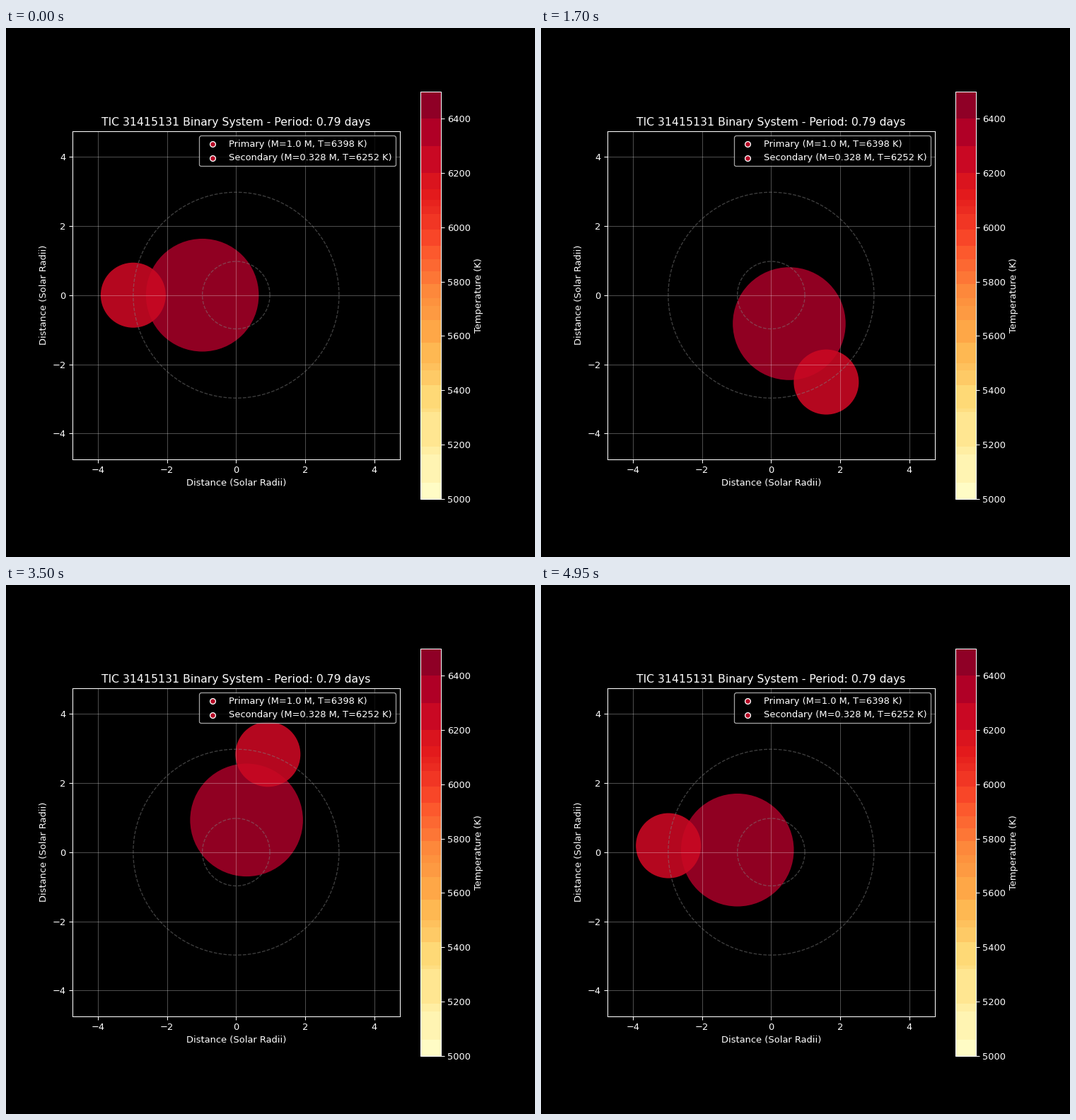
These frames come from a looping animation (748 px wide and 748 px high, 5 s). A matplotlib script:

```python
import numpy as np
import matplotlib.pyplot as plt
from matplotlib.animation import FuncAnimation
from matplotlib.cm import ScalarMappable
from matplotlib.colors import Normalize
from matplotlib.patches import Circle

FRAMES = 100
INTERVAL = 50

# Binary system, in solar units and days
M1, M2 = 1.0, 0.328
T1, T2 = 6398, 6252
R1, R2 = 1.632, 0.941
PERIOD = 0.79

# Kepler's third law, AU converted to solar radii
sep = ((M1 + M2) * (PERIOD / 365.25) ** 2) ** (1 / 3) * 215.03
orbit1 = sep * M2 / (M1 + M2)
orbit2 = sep * M1 / (M1 + M2)

# Temperatures where the stepped colour scale changes
STEPS = [5000, 5060, 5164, 5193, 5320, 5333, 5419, 5474, 5500, 5576, 5659,
         5711, 5740, 5792, 5838, 5883, 5932, 5992, 6050, 6078, 6102, 6141,
         6200, 6299, 6401, 6500]

plt.style.use("dark_background")
fig, ax = plt.subplots(figsize=(8, 8), dpi=93.5)
scale = ScalarMappable(Normalize(5000, 6500), "YlOrRd")


def add_star(radius, temp, label):
    star = Circle((0, 0), radius, facecolor=scale.to_rgba(temp),
                  edgecolor="none", alpha=0.9)
    ax.add_patch(star)
    ax.scatter([], [], s=36, color="#b40424", edgecolors="white",
               linewidths=1, label=label)
    return star


def add_orbit(radius):
    a = np.linspace(0, 2 * np.pi, 200)
    ax.plot(radius * np.cos(a), radius * np.sin(a), "--", color="gray",
            lw=1, alpha=0.5)


star1 = add_star(R1, T1, f"Primary (M={M1} M, T={T1} K)")
star2 = add_star(R2, T2, f"Secondary (M={M2} M, T={T2} K)")
add_orbit(orbit1)
add_orbit(orbit2)

lim = 1.2 * sep
ax.set(xlim=(-lim, lim), ylim=(-lim, lim), aspect="equal",
       xticks=range(-4, 5, 2), yticks=range(-4, 5, 2),
       xlabel="Distance (Solar Radii)", ylabel="Distance (Solar Radii)",
       title=f"TIC 31415131 Binary System - Period: {PERIOD} days")
ax.grid(True, alpha=0.3)
ax.legend(loc="upper right")

bar = fig.colorbar(scale, ax=ax, boundaries=STEPS, spacing="proportional",
                   ticks=range(5000, 6401, 200), label="Temperature (K)")
bar.minorticks_off()


def update(i):
    a = np.pi + 2 * np.pi * i / FRAMES
    direction = np.array([np.cos(a), np.sin(a)])
    star1.center = orbit1 * direction
    star2.center = orbit2 * direction
    return star1, star2


anim = FuncAnimation(fig, update, frames=FRAMES, interval=INTERVAL,
                     repeat=True, repeat_delay=0)
plt.show()
```
